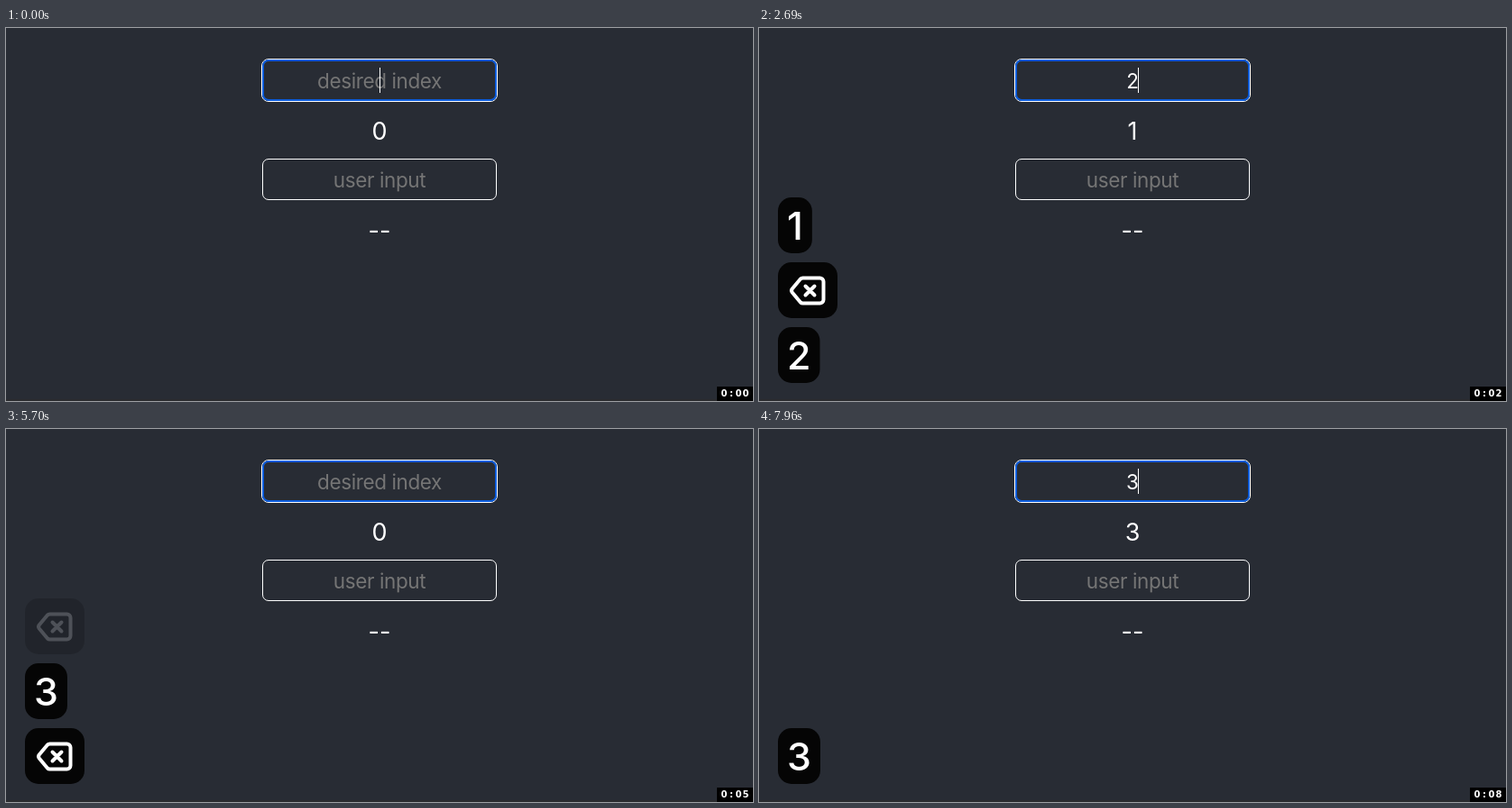
An HTML page that plays this animation: 828x414 px, repeating every 8000 ms.

```html
<!DOCTYPE html>
<html>
<head>
<meta charset="utf-8">
<style>
  html, body { margin: 0; width: 100%; height: 100%; overflow: hidden; background: #282c34; }
  svg { display: block; font-family: Inter, sans-serif; fill: #fff; text-anchor: middle; }
  .field { font-size: 22.5px; }
  .hint { fill: #757575; letter-spacing: -.4px; }
  .output { font-size: 27px; }
  .key { font-size: 43px; font-weight: 500; }
  .clock { font: bold 10px "DejaVu Sans", sans-serif; }
</style>
</head>
<body>
<svg width="828" height="414" viewBox="0 0 828 414">
  <rect y="412" width="828" height="2" fill="#2a2b2e"/>
  <g fill="none">
    <rect x="283.5" y="34.5" width="261" height="47" rx="7.5" stroke="#fff"/>
    <rect x="285" y="36" width="258" height="44" rx="6" stroke="#0b5cdc" stroke-width="2"/>
    <rect x="284.5" y="145.5" width="259" height="45" rx="6.5" stroke="#fff"/>
  </g>
  <text class="field hint" x="414" y="177">user input</text>
  <text class="output" x="414" y="234">--</text>
  <g id="live"></g>
</svg>
<script>
const LOOP = 8000;
const STEP = 150, LEAD = 10;
const HOLD = 2000, FADE = 200;                // life of a keycap
const BLINK = 500, CARET_LAG = 70, FIRST_BLINK = -450;
const DEL = 'del';
const presses = [[700, '1'], [1610, DEL], [2580, '2'], [3535, DEL], [4660, '3'], [5650, DEL], [7600, '3']];

const deleteIcon = `<path d="M27.5 17.5H46.5a4 4 0 0 1 4 4V41.5a4 4 0 0 1-4 4H27.5q-1.5 0-2.5-1L15.8 33.5
  q-1.5-2 0-4L25 18.5q1-1 2.5-1zM30.5 26.5l10 10m0-10l-10 10" fill="none" stroke="#fff"
  stroke-width="4" stroke-linecap="round" stroke-linejoin="round"/>`;

const pen = document.createElement('canvas').getContext('2d');
function textWidth(text, font) {
  pen.font = font + ' Inter, sans-serif';
  return pen.measureText(text).width;
}

const sequence = n => n < 2 ? n : sequence(n - 1) + 2 * sequence(n - 2);

function caretVisible(t) {
  const resets = [FIRST_BLINK, ...presses.map(([at]) => at + CARET_LAG)];
  const last = resets.findLast(at => at <= t);
  return (t - last) % (2 * BLINK) < BLINK;
}

function keycap(key, row, opacity) {
  const width = 20 + (key === DEL ? 46 : textWidth(key, '500 43px'));
  const face = key === DEL ? deleteIcon : `<text class="key" x="${width / 2}" y="47">${key}</text>`;
  return `<g transform="translate(21 ${332 - 72 * row})" opacity="${opacity}">
    <rect width="${width}" height="62" rx="15" fill="#050505"/>${face}</g>`;
}

function clock(t) {
  const seconds = Math.floor((t + STEP) / 1000);
  const glyphs = [...`0:0${seconds}`].map((c, i) => `<text class="clock" x="${796 + 8 * i}" y="409">${c}</text>`);
  return '<rect x="788" y="398" width="40" height="16" fill="#000"/>' + glyphs.join('');
}

function render(t) {
  const pressed = presses.filter(([at]) => at <= t).reverse();
  const value = pressed.length && pressed[0][1] !== DEL ? pressed[0][1] : '';
  const caretX = 414 + Math.floor(textWidth(value, '22.5px') / 2);
  const keys = pressed.map(([at, key], row) => {
    const opacity = Math.min(1, 1 - (t - at - HOLD) / FADE);
    return opacity > 0 ? keycap(key, row, opacity) : '';
  });
  return `<text class="field ${value ? '' : 'hint'}" x="414" y="67">${value || 'desired index'}</text>
    ${caretVisible(t) ? `<rect x="${caretX}" y="44" width="1" height="28"/>` : ''}
    <text class="output" x="414" y="123.7">${sequence(+value)}</text>
    ${keys.join('')}${clock(t)}`;
}

const live = document.getElementById('live');
let shown = -1;
function frame() {
  const now = performance.now() % LOOP;
  const t = Math.floor((now + LEAD) / STEP) * STEP;
  if (t !== shown) live.innerHTML = render(shown = t);
  requestAnimationFrame(frame);
}
frame();
</script>
</body>
</html>
```
